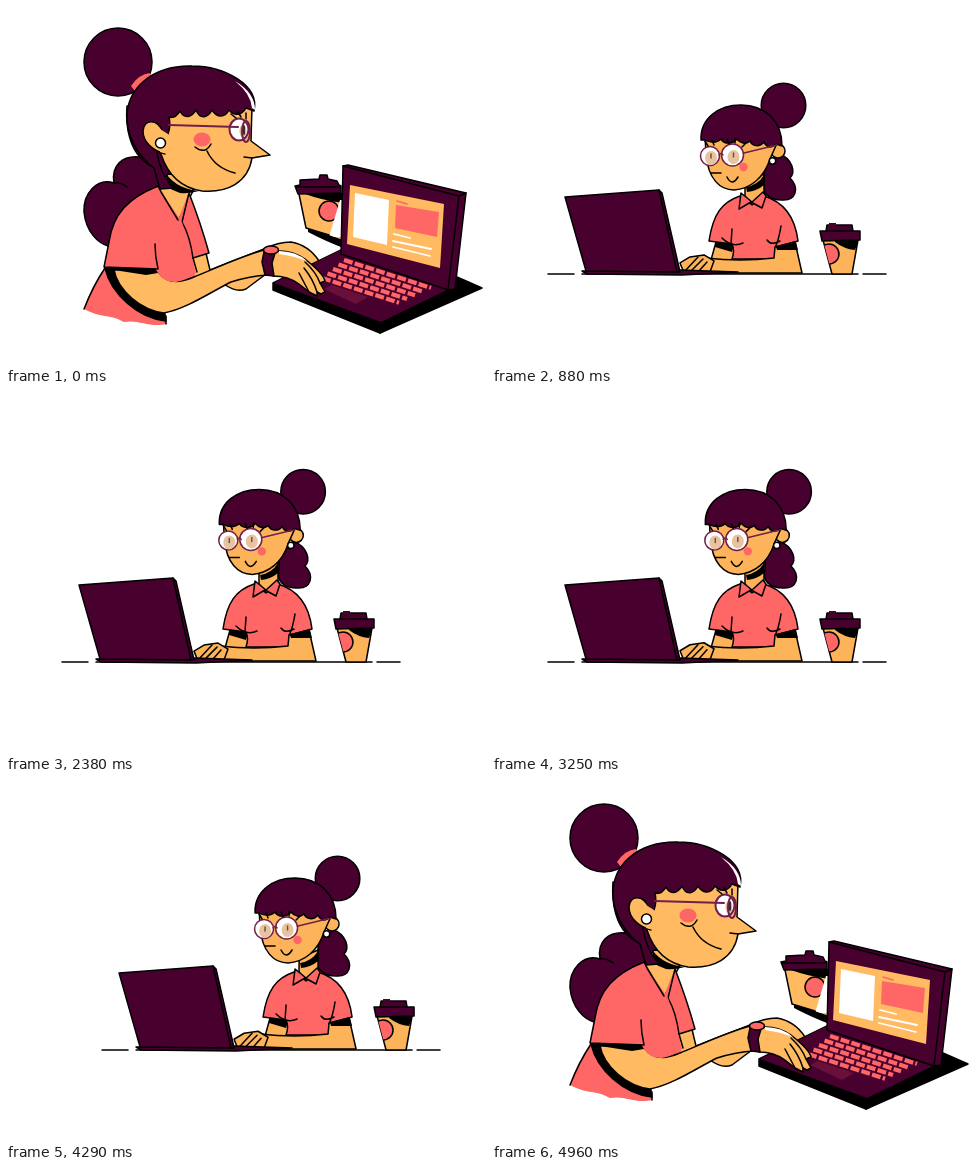
An HTML page for the animation above (5000 ms loop, 480 by 360 pixels).

```html
<!DOCTYPE html>
<html lang="en">
<head>
<meta charset="utf-8">
<title>Working at the laptop</title>
<style>
html, body { margin: 0; width: 100%; height: 100%; overflow: hidden; background: #fff; }
svg { display: block; width: 480px; height: 360px; }
path, circle, ellipse, polygon { stroke: #000; stroke-width: 1.5; stroke-linejoin: round; stroke-linecap: round; }
.d { fill: #48002f; }
.s { fill: #fdb359; }
#close .s { fill: #ffba62; }
.p { fill: #ff6666; }
.w { fill: #fff; }
.k { fill: #000; }
.n { stroke: none; }
.l { fill: none; }
.r { stroke: #70204a; }
#close .r { stroke-width: 2; }
.keys { fill: none; stroke: #ff6666; stroke-linecap: butt; stroke-width: 4.2; stroke-dasharray: 9 2.2; }
</style>
</head>
<body>
<svg viewBox="0 0 480 360">
<defs>
  <clipPath id="cupClip"><path d="M331 234H366L360 268H340Z"/></clipPath>
  <clipPath id="sideClip"><path d="M293 187L337 187V234L323 229L300 222Z"/></clipPath>
</defs>

<g id="close">
  <!-- hair behind -->
  <path class="d" d="M121 100C119 125 126 143 134 151C116 149 105 160 108 177C91 171 77 188 78 206C80 226 92 237 102 240L154 198L172 175L150 100Z"/>
  <path class="l" d="M108 177C112 176 117 178 121 181M134 151Q140 158 147 161"/>
  <circle class="d" cx="112" cy="56" r="34"/>
  <path class="p n" d="M125 80Q133 68 144 67L148 79Q138 82 132 89Z"/>
  <!-- far arm -->
  <path class="s" d="M186 250L200 247Q202 256 204 264L258 243C268 238 276 236 285 236C296 238 306 244 313 255L314 264L268 262L240 283Q230 287 218 278L184 276Z"/>
  <!-- neck and torso -->
  <path class="s" d="M162 168L152 181L172 215L187 185V170Z"/>
  <path class="k n" d="M161 169Q172 183 193 185Q182 188 174 187Q166 184 159 180Z"/>
  <path class="p n" d="M153 181L172 214L183 186L187 250L189 270L160 290L160 318C143 322 133 313 118 316C104 308 94 312 78 303Q85 280 99 262L104 230Q115 195 153 181Z"/>
  <path class="l" d="M99 262Q87 280 78 303M160 310V318"/>
  <path class="p" d="M183 187Q195 218 203 247L187 252Q184 230 176 216Z"/>
  <path class="l" d="M187 252L191 266"/>
  <!-- near arm -->
  <path class="k" d="M99 262C105 288 132 312 160 315L158 304L138 262Z"/>
  <path class="s" d="M108 264C112 285 135 304 158 307C180 303 205 286 225 276Q244 270 262 269L258 244C230 252 206 264 188 271Q160 283 150 262Z"/>
  <path class="k n" d="M108 264L152 261V267L140 269Z"/>
  <path class="p n" d="M150 236V264Q157 277 170 276Q181 274 190 267L176 216Z"/>
  <path class="p n" d="M152 181C122 192 107 208 103 236L98 261L152 263L149 237L176 216Z"/>
  <path class="l" d="M172 214L155 186L152 180C122 192 107 208 103 236L98 261L152 263Q149 250 149 238"/>
  <!-- face -->
  <path class="s" d="M150 116L165 100L246 100L245 135L264 149L246 152C242 177 221 187 196 185C177 182 162 170 155 148Z"/>
  <path class="l" d="M246 152L238 151"/>
  <path class="d" d="M167 182Q154 168 151 146L155 128L162 128Q165 120 163 111Q169 113 174 105C178 113 185 112 190 104C194 114 202 112 206 104C211 112 219 112 223 104C229 111 236 109 240 102L248 105C254 79 218 60 186 60C147 59 120 82 121 113C122 134 134 152 148 162L154 183Z"/>
  <path class="w n" d="M229 75Q249 87 249 104L246 102Q245 88 229 75Z"/>
  <path class="s" d="M159 148C148 145 137 137 137 125C138 113 151 112 157 126Z"/>
  <path class="s n" d="M154 123L162 128L168 150L154 146Z"/>
  <circle class="w" cx="154.500" cy="137" r="5"/>
  <ellipse class="p n" cx="196" cy="133.500" rx="8.500" ry="7"/>
  <path class="l" d="M189 141Q199 149 205 138M201 145Q209 162 229 167"/>
  <ellipse class="w r" cx="233" cy="123.500" rx="9.500" ry="11"/>
  <ellipse class="n" cx="237" cy="125" rx="3.500" ry="6" fill="#e0b09a"/>
  <path class="l" d="M238 120V128M230 112L225 108M235 111L232 106M240 113L240 107"/>
  <ellipse class="l r" cx="240" cy="125.500" rx="4" ry="10.500"/>
  <path class="l r" d="M163 119L232 121"/>
  <!-- cup -->
  <path class="k n" d="M302 222L340 212V243Q319 235 302 226Z"/>
  <g clip-path="url(#sideClip)">
    <path class="s n" d="M290 185H340V236H295Z"/>
    <circle class="p" cx="323" cy="205" r="10"/>
    <path class="k n" d="M296 187H338V197Q318 195 296 187Z"/>
    <path class="w n" d="M334 194L323 231H340V194Z"/>
  </g>
  <path class="l" d="M293 188L300 222L323 229"/>
  <path class="d" d="M294 174L313 173L314 169H321L322 173L331 175L333 179L335 180V187L292 188L289 180L294 179Z"/>
  <path class="l" d="M290 181L334 181"/>
  <!-- laptop -->
  <path class="k" d="M374 327L476 282L451 271L360 310Z"/>
  <path class="k" d="M267 277L335 244L449 280L445 290L374 327L267 284Z"/>
  <path class="d n" d="M268 277L335 244L447 281L375 316Z"/>
  <path class="d" d="M337 160L342 159L460 187L449 283L442 284L335 248Z"/>
  <path class="l" d="M337 160L453 190L442 284M453 190L460 187"/>
  <path class="s n" d="M344 179L438 198L434 262L341 238Z"/>
  <path class="w n" d="M349 187L383 194L381 239L347 231Z"/>
  <path class="p n" d="M390 199L433 206L431 231L389 222Z"/>
  <path class="l" style="stroke:#ff6666" d="M391 195L401 198"/>
  <path class="l" style="stroke:#fff;stroke-width:1.8" d="M388 228L404 232M387 235L425 243M387 241L424 250"/>
  <path class="n" fill="#69103a" d="M318 283L326 279L362 291L350 298Z"/>
  <g id="keys"></g>
  <!-- near hand and watch -->
  <path class="s" d="M264 246C278 243 290 247 299 253C309 261 318 270 319 275L314 277L319 286L315 288L311 286L311 290L303 286L293 278Q282 270 267 270Z"/>
  <path class="w n" d="M273 245Q290 245 301 255Q288 250 273 248Z"/>
  <path class="l" d="M299 256Q310 266 314 277M298 262Q307 273 311 286M293 267L303 286"/>
  <path class="d" d="M258 246L270 244L266 257L268 270L259 269L256 256Z"/>
  <ellipse class="p" cx="265" cy="244" rx="7.500" ry="4"/>
</g>

<g id="desk">
  <g id="woman">
    <g id="tail"><path class="d" d="M272 158L288 148C300 153 304 166 298 172C308 182 304 195 290 194C277 194 269 187 272 176Z"/></g>
    <path id="skirt" class="d" d="M235 249L272 247L279 268H225Z"/>
    <path class="s" d="M253 176L272 168V190L261 200L253 190Z"/>
    <path class="k n" d="M254 181Q266 179 272 169V179Q265 185 255 186Z"/>
    <path class="s" d="M224 236L219 254H242V238Z"/>
    <path class="k n" d="M224 235L242 238L240 246L223 241Z"/>
    <path class="p" d="M248 190C230 196 221 208 217 235L240 238Q243 244 240 253H283L284 241L306 235C303 210 292 196 272 190L260 199Z"/>
    <path class="p" d="M249 187L247 203L259 196L270 202L274 190L271 186L260 196Z"/>
    <path class="l" d="M230 232Q240 242 251 237M275 234Q279 240 288 235M240 223L239 238M289 220Q287 233 283 242"/>
    <g id="downArm">
      <path class="s" d="M283 242L303 236L305 268H283Z"/>
      <path class="k n" d="M284 242L303 236L304 246L284 249Z"/>
    </g>
    <g id="deskArm">
      <path class="s" d="M283 241L303 236L310 267H205L214 252Q248 256 282 252Z"/>
      <path class="k n" d="M284 241L304 236L306 244L285 244Z"/>
      <g id="hand">
        <path class="s" d="M188 257L198 251L212 249L222 255L218 266L192 267Z"/>
        <path class="l" d="M206 251L193 265M211 253L199 265M215 256L207 265"/>
      </g>
    </g>
    <g id="head">
      <g id="bun"><circle class="d" cx="291.500" cy="96.500" r="22.300"/></g>
      <circle class="s" cx="286" cy="142" r="7"/>
      <path class="s" d="M213 127L214 145C216 170 228 181 242 181C258 180 272 169 278 150L286 132L250 118Z"/>
      <path class="d" d="M209 131C208 109 227 96 249 96C273 96 290 112 290 137L284 135C279 140 274 138 272 133C267 139 260 137 258 132C254 136 248 134 245 130C240 136 232 135 229 130C224 135 216 133 213 131Z"/>
      <circle class="w" cx="280.500" cy="152" r="3.200"/>
      <g id="glasses"></g>
      <path class="l r" d="M227 146Q229 143 231 146M252 144L285 136"/>
      <path class="l" d="M219 164H229"/>
      <path class="l" d="M216 137L213 132M222 136L220 131M237 135L235 130M243 134L243 129M250 138L254 134"/>
      <circle class="p n" cx="251.500" cy="158" r="4.200"/>
      <path id="smile" class="l" d="M235 168Q240 178 246 168"/>
      <ellipse id="gasp" class="k" cx="239" cy="169" rx="1.800" ry="5"/>
    </g>
  </g>
  <path id="table" class="l"/>
  <g id="cup">
    <path class="s" d="M331 234H366L360 268H340Z"/>
    <g clip-path="url(#cupClip)">
      <circle id="badge" class="p" cx="337" cy="248" r="10"/>
      <path class="k n" d="M343 234H367L363 244Q352 243 343 236Z"/>
    </g>
    <path class="d" d="M328 225H334L335 219H360L361 225H368V234L330 235Z"/>
    <path class="l" d="M334 225H361"/>
    <rect id="nub" class="d" x="337" y="217" width="7" height="3"/>
  </g>
  <polygon id="base" class="d"/>
  <polygon id="lid" class="d"/>
  <path id="edge" class="l"/>
</g>
</svg>
<script>
const LOOP = 5000;
const el = id => document.getElementById(id);
const clamp = x => Math.max(0, Math.min(1, x));
const ease = (t, a, b) => { const x = clamp((t - a) / (b - a)); return x * x * (3 - 2 * x); };
const mix = (a, b, m) => a + (b - a) * m;
const move = (id, x, y = 0) => el(id).setAttribute('transform', `translate(${x} ${y})`);
const show = (id, on) => { el(id).style.display = on ? '' : 'none'; };
const blend = (from, to, m) => from.map((v, i) => mix(v, to[i], m));

// Resting and turned laptop outlines
const LID = [[73, 191, 167, 184, 170, 187, 188, 266, 94, 265], [57, 186, 206, 185, 209, 188, 216, 272, 70, 268]];
const BASE = [[90, 265, 188, 264, 246, 266, 190, 269, 95, 268], [68, 268, 213, 270, 242, 268, 215, 276, 68, 271]];

for (let i = 0; i < 5; i++) {
  const x = 338 - i * 5.5, y = 254 + i * 4.5, end = 425 - i * 8;
  el('keys').innerHTML += `<path class="keys" d="M${x} ${y}L${end} ${y + (end - x) * 0.32}"/>`;
}

el('glasses').innerHTML = [[218, 147, 9.5], [240.500, 146, 11]].map(([x, y, r]) =>
  `<circle class="w r" cx="${x}" cy="${y}" r="${r}"/>
   <ellipse class="n" cx="${x + 1}" cy="${y + 2}" rx="6" ry="7" fill="#e9c3a0"/>
   <path class="l" style="stroke:#705044" d="M${x + 1} ${y - 2}v4"/>`).join('');

function drawClose(t) {
  const leaving = t < 2000;
  show('close', t < 230 || t > 4680);
  if (leaving) {
    const k = t < 35 ? 0 : (Math.exp((t - 35) / 40) - 1) * 5;
    const zoom = 1 + 0.13 * ease(t, 35, 160);
    el('close').setAttribute('transform', `translate(${k} ${198 * (1 - zoom)}) scale(${zoom})`);
  } else {
    move('close', -480 * Math.pow(1 - clamp((t - 4680) / 275), 3));
  }
}

function drawDesk(t) {
  const visible = t >= 230 && t < 4500;
  show('desk', visible);
  if (!visible) return;

  const enter = -480 * Math.pow(1 - clamp((t - 220) / 150), 3);
  const exit = t < 3830 ? 0 : 39.5 * Math.exp((t - 4290) * 0.01395);
  move('desk', enter + exit);

  const turn = 1 - ease(t, 380, 570);
  const sway = ease(t, 1500, 2200) - ease(t, 3500, 4150);
  const dip = 3 * (ease(t, 420, 560) - ease(t, 1000, 1250));
  move('woman', -19 * turn);
  move('head', 4.3 * sway + 2.5 * turn, dip - 0.6 * sway - turn);
  move('bun', 1.3 * sway + turn, 1.8 * sway + turn);
  move('tail', sway);

  const typing = turn < 0.5;
  show('deskArm', typing);
  show('downArm', !typing);
  show('skirt', !typing);
  show('smile', typing);
  show('gasp', !typing);
  move('hand', 0, turn ? 0 : 0.6 * Math.sin(t / 40));

  const lid = blend(...LID, turn);
  el('lid').setAttribute('points', lid);
  el('base').setAttribute('points', blend(...BASE, turn));
  el('edge').setAttribute('d', `M${lid[2]} ${lid[3]}L${lid[6] - 3} ${lid[7]}`);
  const dash = (a, b, from, to) => `M${mix(a, from, turn)} 268H${mix(b, to, turn)}`;
  el('table').setAttribute('d', dash(56, 82, 240, 240) + dash(90, 366, 240, 345) + dash(371, 394, 345, 345));

  move('cup', 10.5 * turn);
  move('nub', 13 * turn);
  move('badge', -22 * turn);
}

function frame(now) {
  const t = now % LOOP;
  drawClose(t);
  drawDesk(t);
  requestAnimationFrame(frame);
}
frame(0);
</script>
</body>
</html>
```
